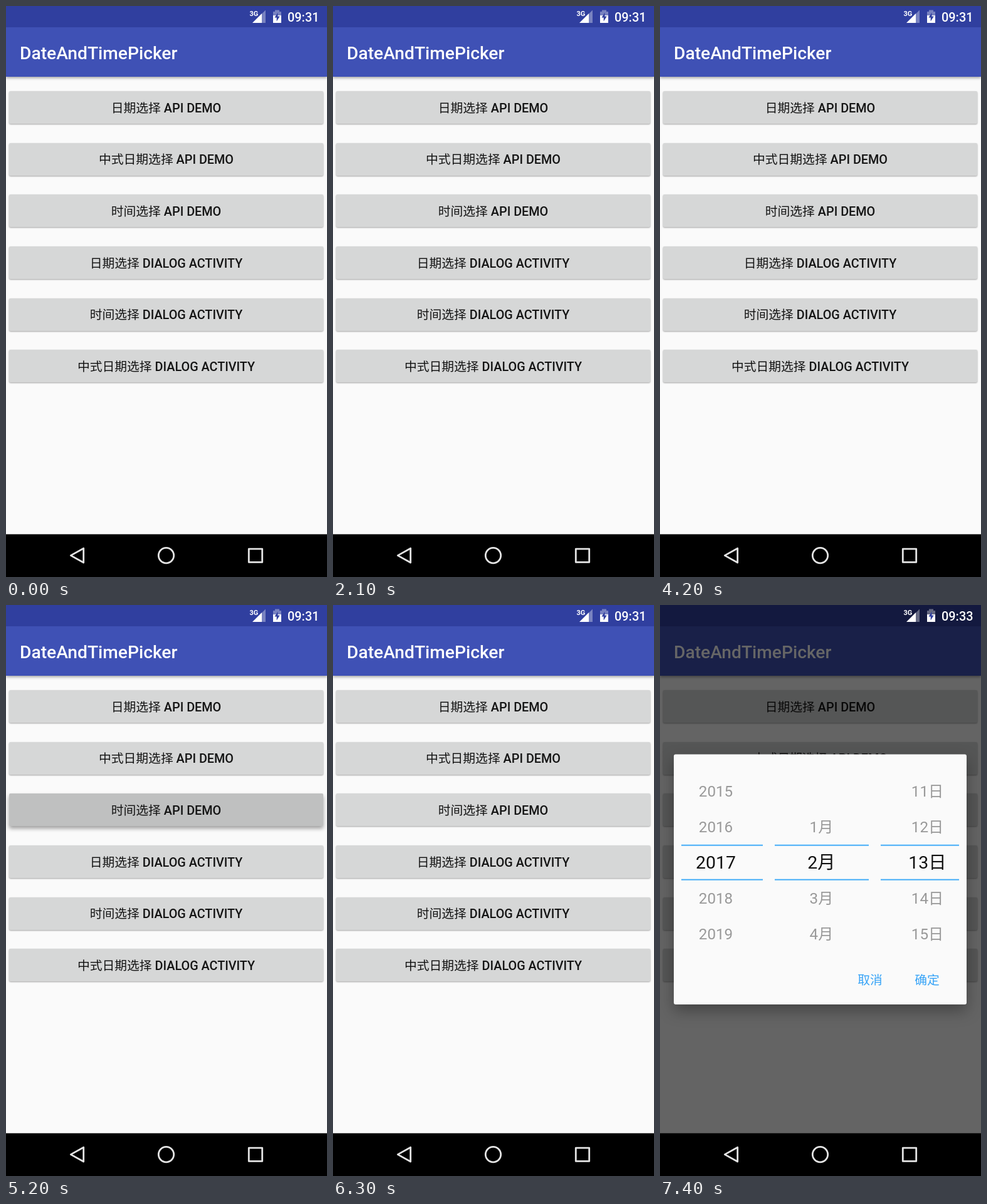
Animation of 512x912 px, one loop 8 s. Source, as an HTML page:

```html
<!DOCTYPE html>
<html lang="zh-CN">
<head>
<meta charset="utf-8">
<style>
html, body { margin: 0; width: 100%; height: 100%; overflow: hidden; background: #000; }
svg { display: block; width: 512px; height: 912px; }
text { font-family: Roboto, 'Noto Sans CJK SC', 'Noto Sans CJK', sans-serif; }
.btn { fill: #d6d7d7; filter: drop-shadow(0 1.5px 1.3px rgba(0,0,0,.36)); }
.btn.down { fill: #bfc0c0; filter: drop-shadow(0 4px 3px rgba(0,0,0,.36)); }
.bar { fill: #3f51b5; filter: drop-shadow(0 2px 2px rgba(0,0,0,.35)); }
.card { fill: #fafafa; filter: drop-shadow(0 10px 12px rgba(0,0,0,.32)); }
</style>
</head>
<body>
<svg id="stage" viewBox="0 0 512 912"></svg>
<script>
const rect = (x, y, w, h, attrs) => `<rect x="${x}" y="${y}" width="${w}" height="${h}" ${attrs}/>`;

// Chinese runs stay regular while Latin text may be medium
const text = (s, x, y, size, fill, weight = 400, anchor = 'middle') =>
  `<text x="${x}" y="${y}" font-size="${size}" fill="${fill}" font-weight="${weight}" text-anchor="${anchor}">` +
  s.replace(/[\u4e00-\u9fff]+/g, '<tspan font-weight="400">$&</tspan>') + '</text>';

const buttons = (labels, top, step) => labels.map((s, i) => {
  const y = top + i * step;
  return rect(5, Math.round(y), 501, 52, 'rx="2" class="btn"') +
    text(s, 255.5, Math.round(y + 33.8), 19.8, '#141414', 500);
}).join('');

// One wheel: five values around a selected middle row
const wheel = (values, cx, mid, left, right) =>
  values.map((s, i) => i == 2
    ? text(s, cx, mid + 10, 28.4, '#111')
    : text(s, cx, mid + 8.7 + (i - 2) * 57, 24.2, '#999')).join('') +
  [mid - 28.3, mid + 26.7].map(y => rect(left, y, right - left, 2, 'fill="#44adf8"')).join('');

const run = (first, unit = '') => [0, 1, 2, 3, 4].map(i => first + i < 1 ? '' : first + i + unit);

const dateWheels = (mid, left, right) =>
  wheel(run(2015), 89, mid, left, 164) +
  wheel(run(0, '月'), 257.5, mid, 183, 333) +
  wheel(run(11, '日'), 426.5, mid, 352, right);

const status = clock =>
  text('3G', 388.5, 15.5, 11, '#fff', 700, 'start') +
  '<path d="M408 12.5L414 6.5V27H408Z" fill="#fff" opacity=".35"/>' +
  '<path d="M393 27L408 12V27Z" fill="#fff"/>' +
  '<path d="M426 15V9H429V6.5H436V9H439V15Z" fill="#fff" opacity=".35"/>' +
  '<path d="M426 15H439V27H426Z" fill="#fff"/>' +
  '<path d="M433.5 10.5L428.5 18.5H431.7V24.5L436.7 16.5H433.5Z" fill="#303f9f"/>' +
  text(clock, 449, 25, 19.9, '#fff', 500, 'start');

const page = body =>
  rect(0, 0, 512, 844, 'fill="#fafafa"') + body +
  rect(0, 34, 512, 79, 'class="bar"') + rect(0, 0, 512, 34, 'fill="#303f9f"') +
  text('DateAndTimePicker', 22, 85, 28.2, '#fff', 500, 'start');

const menu = page(buttons([
  '日期选择 API DEMO', '中式日期选择 API DEMO', '时间选择 API DEMO',
  '日期选择 DIALOG ACTIVITY', '时间选择 DIALOG ACTIVITY', '中式日期选择 DIALOG ACTIVITY'
], 135.8, 82.7));

const datePage = top => page(dateWheels(251, 14, 502) + buttons([
  '时间戳转成日期', '默认时间显示格式', '自定义时间显示格式(yyyy/MM/dd)',
  '更改显示时间(2016.10.25)', '更改背景'
], top, 75.6)) + status('09:32');

const timePage = page(
  wheel(run(6), 173.5, 251, 99, 248) + wheel(run(30), 342, 251, 267, 417) +
  buttons(['显示时间', '更改显示时间(20:50)', '更改背景', 'setVisibleItems', 'recycle'], 495, 75.6) +
  rect(506, 473, 6, 164, 'fill="#000" opacity=".13"')) + status('09:32');

const dialogPage = menu + rect(0, 0, 512, 844, 'opacity=".6"') +
  rect(22, 238.5, 467, 399.5, 'rx="3" class="card"') + dateWheels(411, 34, 477) +
  text('取消', 335, 606, 19.8, '#36a3f7') + text('确定', 426, 606, 19.8, '#36a3f7') +
  status('09:33');

const navBar = rect(0, 843.7, 512, 69, '') +
  '<g fill="none" stroke="#e4e4e4" stroke-width="2.8" stroke-linejoin="round">' +
  '<path d="M103.3 877.6L123.7 866.3V889Z"/><circle cx="255.5" cy="877.6" r="12.2"/>' +
  rect(387.3, 867.2, 21.4, 21.2, '') + '</g>';

const opened = [datePage(481), datePage(495), timePage, dialogPage];
const stage = document.getElementById('stage');
stage.innerHTML = `<g id="menu">${menu}${status('09:31')}</g>` +
  opened.map(s => `<g class="opened">${s}</g>`).join('') + navBar;
const menuButtons = stage.querySelectorAll('#menu .btn');
const pages = stage.querySelectorAll('.opened');

// Each visit: menu for 1 s, its button held down for 0.1 s, then the opened page for 1 s
function draw(now) {
  const t = now % 8000, visit = Math.floor(t / 2100), phase = t % 2100;
  const isOpen = phase >= 1100, isDown = phase >= 1000 && !isOpen;
  menuButtons.forEach((b, i) => b.classList.toggle('down', isDown && i == visit));
  pages.forEach((p, i) => p.style.display = isOpen && i == visit ? '' : 'none');
}

const start = performance.now();
function tick() {
  draw(performance.now() - start);
  requestAnimationFrame(tick);
}
tick();
</script>
</body>
</html>
```
